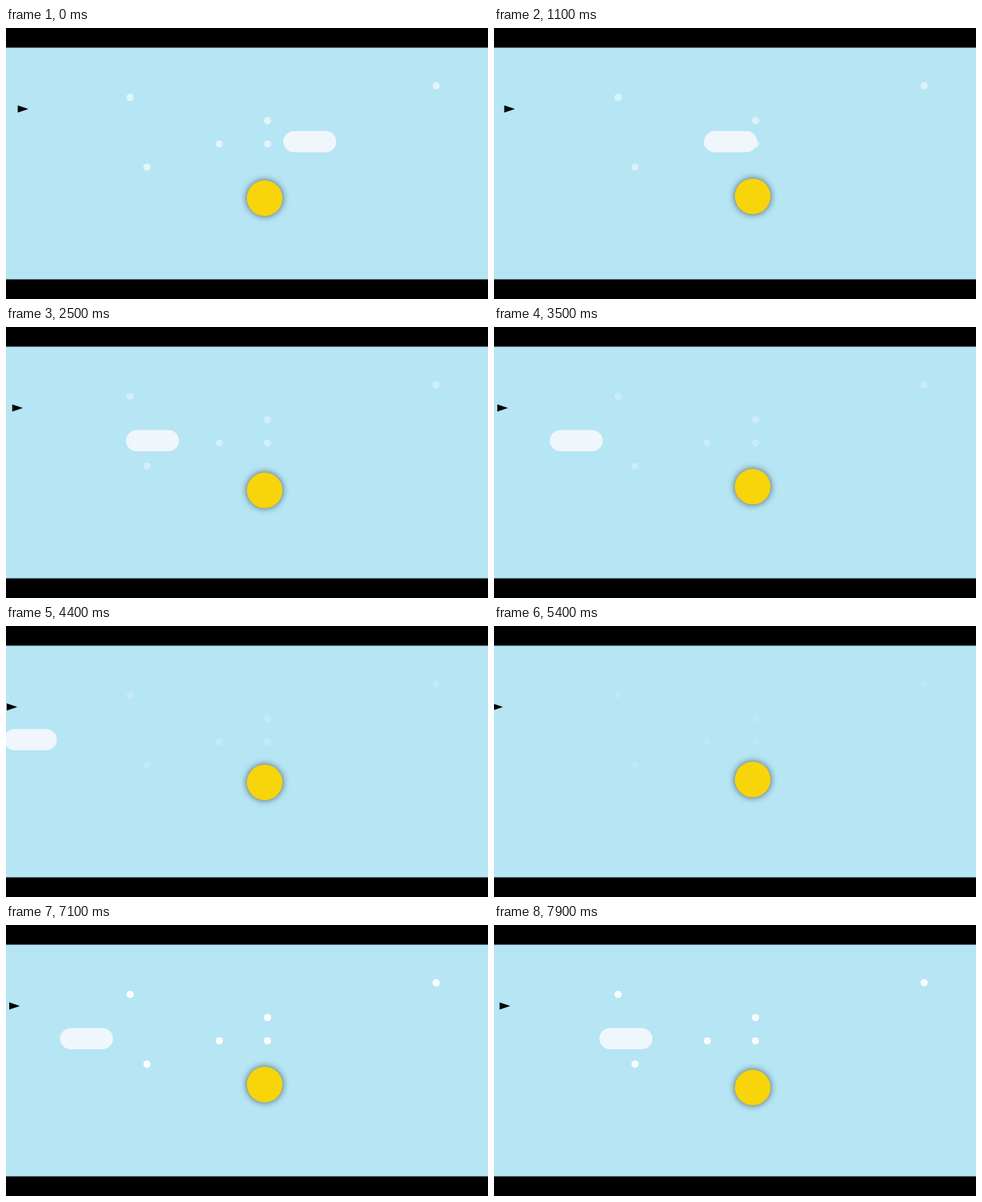
An HTML page with a canvas that plays this animation: 600x338 px, repeating every 8 s.

```html
<!DOCTYPE html>
<html lang="en">
<head>
<meta charset="utf-8">
<title>Sky</title>
<style>
  html, body { margin: 0; width: 100%; height: 100%; overflow: hidden; background: #000; }
  canvas { display: block; }
</style>
</head>
<body>
<canvas id="stage" width="600" height="338"></canvas>
<script>
const ctx = document.getElementById('stage').getContext('2d');
const LOOP = 8000;
const TURN = 5315; // everything reverses direction here
const DOTS = [[154.5, 86.5], [175.5, 173.5], [265.5, 144.5], [325.5, 144.5], [325.5, 115.5], [535.5, 72]];

// Time away from the turn, folded back at the far end of the travel.
function swing(t, span) {
  const d = Math.abs(t - TURN);
  return d > span ? 2 * span - d : d;
}

function disc(x, y, r) {
  ctx.beginPath();
  ctx.arc(x, y, r, 0, 2 * Math.PI);
  ctx.fill();
}

function drawDots(t) {
  const fade = (t + 4350) / 11000 % 1;
  ctx.fillStyle = `rgba(255, 255, 255, ${1 - fade})`;
  for (const [x, y] of DOTS) disc(x, y, 4.5);
}

function drawCloud(t) {
  ctx.fillStyle = '#eff6fc';
  ctx.beginPath();
  ctx.roundRect(-75.7 + 0.08 * swing(t, 5287), 128.5, 66, 26.5, 13.25);
  ctx.fill();
}

function drawSun(t) {
  ctx.save();
  ctx.shadowColor = 'rgba(0, 0, 0, 0.6)';
  ctx.shadowBlur = 9;
  ctx.fillStyle = '#f8d40a';
  disc(322, 191 + 0.0045 * swing(t, 5020), 22.2);
  ctx.restore();
}

function drawArrow(t) {
  const x = -2.4 + 0.0036 * swing(t, 5020);
  ctx.fillStyle = '#000';
  ctx.beginPath();
  ctx.moveTo(x, 96.6);
  ctx.lineTo(x + 13.3, 101);
  ctx.lineTo(x, 105.5);
  ctx.fill();
}

function draw(t) {
  ctx.fillStyle = '#000';
  ctx.fillRect(0, 0, 600, 338);
  ctx.fillStyle = '#b6e5f4';
  ctx.fillRect(0, 24.5, 600, 289);
  drawDots(t);
  drawCloud(t);
  drawSun(t);
  drawArrow(t);
}

const start = performance.now();
function tick() {
  draw((performance.now() - start) % LOOP);
  requestAnimationFrame(tick);
}
tick();
</script>
</body>
</html>
```
